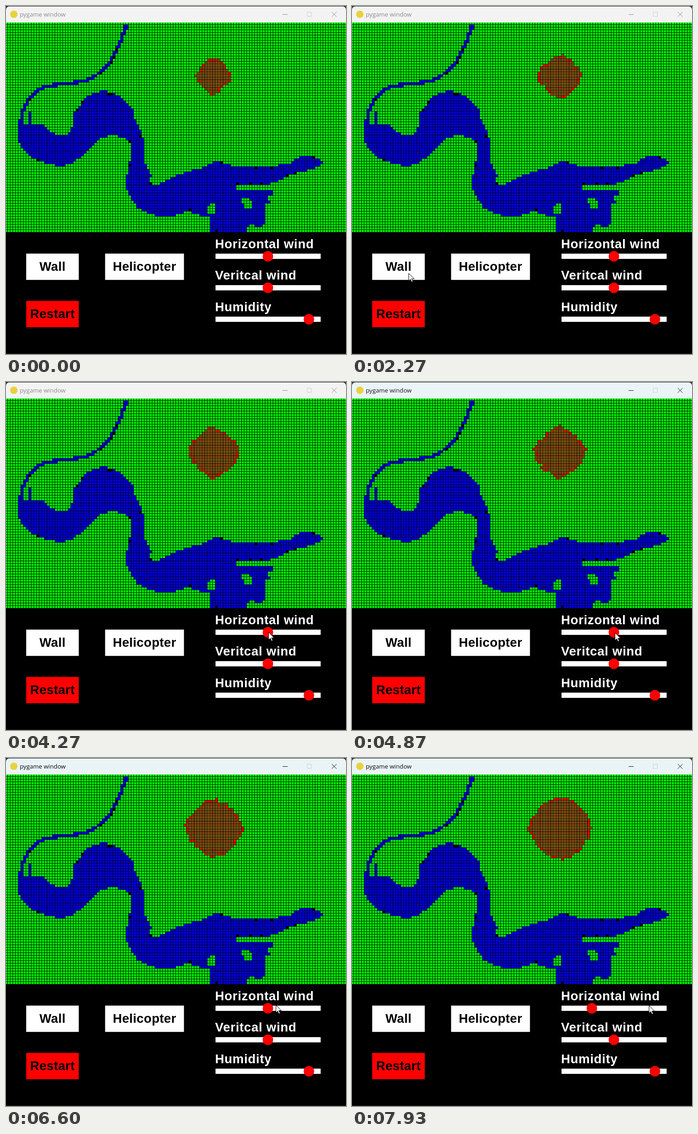
An HTML page with a canvas that plays this animation: 740x757 px, repeating every 8 s.

```html
<!DOCTYPE html>
<html>
<head>
<meta charset="utf-8">
<style>
html, body { margin: 0; width: 740px; height: 757px; overflow: hidden; background: #000; }
canvas { display: block; }
</style>
</head>
<body>
<canvas id="stage" width="740" height="757"></canvas>
<script>
const LOOP = 8000, PITCH = 5.72, LEFT = -1.8, TOP = 35.1, COLS = 130, ROWS = 80;
const TICK = 1000 / 3, TICK_SHIFT = 72;
const FIRE_X = 453, FIRE_Y = 153.5;

const ctx = document.getElementById('stage').getContext('2d');
const ground = document.createElement('canvas');
ground.width = 740;
ground.height = 757;

const midX = c => LEFT + (c + .5) * PITCH;
const midY = r => TOP + (r + .5) * PITCH;
const mix = (a, b, u) => a + (b - a) * u;
const clamp = u => Math.max(0, Math.min(1, u));
const hash = (a, b, c) => {
  const s = Math.sin(a * 12.99 + b * 78.23 + c * 37.72) * 43758.55;
  return s - Math.floor(s);
};

function cell(g, c, r, color) {
  const x = LEFT + c * PITCH, y = TOP + r * PITCH, size = PITCH - 1;
  g.clearRect(x, y, size, size);
  g.fillStyle = color;
  g.fillRect(x, y, size, size);
}

// True for a cell of the shape that touches a cell outside it
const isEdge = (inside, c, r) =>
  !(inside(c - 1, r) && inside(c + 1, r) && inside(c, r - 1) && inside(c, r + 1));

// Terrain
const river = new Path2D('M264 40C245 85 240 130 178 162C130 172 110 168 78 179C45 200 34 230 31 262');
const lake = new Path2D(`M26 258H78C95 270 100 281 118 281C155 281 142 245 150 232
  C170 200 185 187 213 186C245 186 262 212 277 224C280 255 296 268 300 295
  C299 335 306 355 318 370C308 385 316 391 332 390C360 372 400 358 432 352
  C445 335 470 338 500 350C550 357 605 345 617 343C640 328 665 315 689 341
  C682 356 655 358 618 368C600 378 590 386 570 388H501V401H580V410H566L576 432H562V478
  Q552 488 535 474L520 493H446V458C425 460 405 450 395 447C360 462 335 462 308 450
  C280 442 272 420 261 390C262 360 274 345 273 303C262 285 235 275 205 289
  C175 310 160 345 125 348C80 347 26 325 26 280ZM49 229H55V257H49Z`);
const islands = new Path2D('M443 430H455V453H438V437H443ZM512 416H528L535 430V440H518Z');

function isWater(c, r) {
  const x = midX(c), y = midY(r);
  return ctx.isPointInStroke(river, x, y) ||
    ctx.isPointInPath(lake, x, y) && !ctx.isPointInPath(islands, x, y);
}

function drawGround() {
  const g = ground.getContext('2d');
  ctx.lineWidth = 7.5;
  for (let c = 0; c < COLS; c++)
    for (let r = 0; r < ROWS; r++) {
      const wet = isWater(c, r);
      const gap = wet && isEdge(isWater, c, r) && hash(c, r, 3) < .06;
      if (!gap) cell(g, c, r, wet ? '#0000f0' : '#00ff00');
    }
}

// Fire: a ragged diamond that grows and rounds off with every tick
function drawFire(t) {
  const tick = Math.floor((t + TICK_SHIFT) / TICK);
  const age = Math.max(0, tick * TICK - TICK_SHIFT) / 1000;
  const reach = 41 + 3.4 * age, power = 1.25 + .05 * age;
  const burnt = (c, r) => {
    const dx = Math.abs(midX(c) - FIRE_X), dy = Math.abs(midY(r) - FIRE_Y);
    return (dx ** power + dy ** power) ** (1 / power) < reach + 5 * (hash(c >> 1, r >> 1, 1) - .5);
  };
  for (let c = 64; c < 96; c++)
    for (let r = 5; r < 37; r++) {
      if (!burnt(c, r)) continue;
      const hot = isEdge(burnt, c, r) && hash(c, r, tick) < .6;
      cell(ctx, c, r, hot ? '#f00' : '#8b4513');
    }
}

// Window frame and controls
function rect(x, y, w, h, color) {
  ctx.fillStyle = color;
  ctx.fillRect(x, y, w, h);
}

function disc(x, y, r, color) {
  ctx.fillStyle = color;
  ctx.beginPath();
  ctx.arc(x, y, r, 0, 7);
  ctx.fill();
}

function text(s, x, y, color, font, align = 'left', spacing = 0) {
  ctx.font = font;
  ctx.textAlign = align;
  ctx.letterSpacing = spacing + 'px';
  ctx.fillStyle = color;
  ctx.fillText(s, x, y);
}

function drawTitle(t) {
  const on = clamp((t - 4600) / 300);
  const shade = (from, to) => `rgb(${from.map((v, i) => Math.round(mix(v, to[i], on)))})`;
  const ink = shade([138, 138, 138], [10, 10, 10]);
  rect(0, 0, 740, 36, '#333');
  ctx.fillStyle = shade([243, 243, 243], [234, 244, 247]);
  ctx.beginPath();
  ctx.roundRect(0, 1, 740, 35, [7, 7, 0, 0]);
  ctx.fill();
  disc(17, 18, 8, '#e8d23c');
  text('pygame window', 30, 23, ink, '13.2px "Open Sans", sans-serif');
  ctx.lineWidth = 1;
  ctx.strokeStyle = ink;
  ctx.stroke(new Path2D('M602 18.5H613M709 13L719.5 23.5M719.5 13L709 23.5'));
  ctx.strokeStyle = '#ccd0d1';
  ctx.strokeRect(655.5, 13.5, 9, 9);
}

const BOLD = 'bold 27.5px "Liberation Sans", Arial, sans-serif';

function button(label, x, y, w, color) {
  rect(x, y, w, 57.2, color);
  text(label, x + w / 2, y + 37.5, '#000', BOLD, 'center', .35);
}

function slider(label, y, knob) {
  text(label, 455, y - 17.5, '#fff', BOLD, 'left', .7);
  rect(456, y - 5.7, 228.8, 11.4, '#fff');
  disc(knob, y, 11.4, '#f00');
}

// Pointer stops: time, x, y
const stops = [
  [600, 719, 730], [1270, 641, 524], [1470, 638, 526], [2130, 125, 601], [2270, 123, 581],
  [3700, 121, 579], [4070, 571, 544], [5270, 573, 546], [5400, 704, 548], [5530, 664, 545],
  [5930, 570, 537], [6600, 587, 537], [7000, 522, 537], [7270, 621, 537], [7930, 646, 538]
];
const arrow = new Path2D('M0 0V16.5L3.8 13L6.4 19L9 17.9L6.4 12H11.8Z');

function pointerAt(t) {
  const next = stops.findIndex(s => s[0] > t);
  if (next < 0) return stops.at(-1).slice(1);
  const b = stops[next], a = stops[Math.max(0, next - 1)];
  const u = a === b ? 0 : (t - a[0]) / (b[0] - a[0]);
  return [mix(a[1], b[1], u), mix(a[2], b[2], u)];
}

function drawPointer(x, y) {
  ctx.save();
  ctx.translate(Math.round(x) + .5, Math.round(y) + .5);
  ctx.fillStyle = '#fff';
  ctx.fill(arrow);
  ctx.lineWidth = 1;
  ctx.strokeStyle = '#000';
  ctx.stroke(arrow);
  ctx.restore();
}

function draw(t) {
  const [x, y] = pointerAt(t);
  const knob = t < 6600 ? 570 : t < 7000 ? Math.min(570, x) : 522;
  ctx.clearRect(0, 0, 740, 757);
  ctx.drawImage(ground, 0, 0);
  drawFire(t);
  drawTitle(t);
  button('Wall', 44, 538.6, 114.4, '#fff');
  button('Helicopter', 215.7, 538.6, 171.6, '#fff');
  button('Restart', 44, 641.5, 114.4, '#f00');
  slider('Horizontal wind', 544.4, knob);
  slider('Veritcal wind', 612.9, 570);
  slider('Humidity', 681.4, 659.3);
  rect(0, 756, 740, 1, '#2a2a2a');
  if (t >= 600) drawPointer(x, y);
}

drawGround();
const start = performance.now();
(function frame() {
  draw((performance.now() - start) % LOOP);
  requestAnimationFrame(frame);
})();
</script>
</body>
</html>
```
